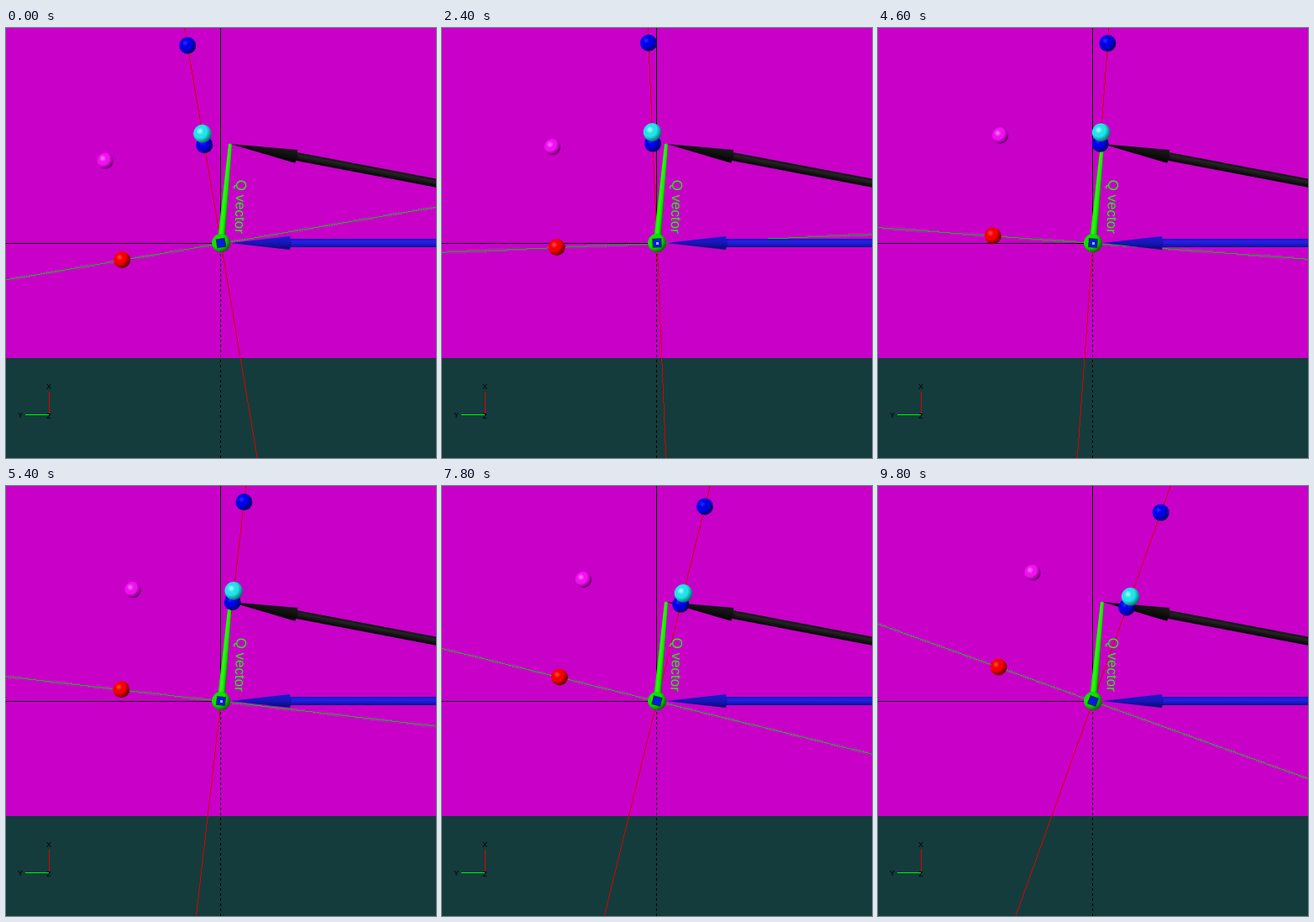
These frames come from a looping animation (512x512 px, 10000 ms). An HTML page with a canvas:

```html
<!DOCTYPE html>
<html lang="en">
<head>
<meta charset="utf-8">
<title>Q vector rotation</title>
<style>
  html, body { margin: 0; width: 100%; height: 100%; overflow: hidden; background: #c800c8; }
  canvas { display: block; width: 512px; height: 512px; }
</style>
</head>
<body>
<canvas id="stage" width="512" height="512"></canvas>
<script>
const ctx = document.getElementById('stage').getContext('2d');
const SIZE = 512, CENTER = 256;
const STEP_MS = 200, STEPS = 50;
const START_DEG = -9.6, STEP_DEG = 0.6;

function rect(color, x, y, w, h) {
  ctx.fillStyle = color;
  ctx.fillRect(x, y, w, h);
}

function polygon(fill, points) {
  ctx.fillStyle = fill;
  ctx.beginPath();
  points.forEach(([x, y]) => ctx.lineTo(x, y));
  ctx.closePath();
  ctx.fill();
}

function shade(x0, y0, x1, y1, colors) {
  const gradient = ctx.createLinearGradient(x0, y0, x1, y1);
  colors.forEach((c, i) => gradient.addColorStop(i / (colors.length - 1), c));
  return gradient;
}

function placed(x, y, angle, paint) {
  ctx.save();
  ctx.translate(x, y);
  ctx.rotate(angle);
  paint();
  ctx.restore();
}

// Lit from the upper left, so the dark rim lies at the lower right.
function ball(x, y, radius, [light, base, dark]) {
  const gradient = ctx.createRadialGradient(x - 3, y - 3, 0, x - 3, y - 3, radius + 4);
  gradient.addColorStop(0, light);
  gradient.addColorStop(0.3, base);
  gradient.addColorStop(0.55, base);
  gradient.addColorStop(1, dark);
  ctx.fillStyle = gradient;
  ctx.beginPath();
  ctx.arc(x, y, radius, 0, Math.PI * 2);
  ctx.fill();
}

const palette = {
  red: ['#ff5040', '#f40000', '#500000'],
  blue: ['#2030ff', '#0000e8', '#000050'],
  cyan: ['#c0ffff', '#20e4e8', '#086468'],
  pink: ['#ff80ff', '#f010f0', '#600060'],
  green: ['#30ff10', '#10e000', '#086000']
};

// Arrow along its local x axis, with the tip at the given point.
function arrow(x, y, angle, head, headHalf, shaftHalf, headColors, shaftColors) {
  placed(x, y, angle, () => {
    rect(shade(0, -shaftHalf, 0, shaftHalf, shaftColors), head, -shaftHalf, 300, shaftHalf * 2);
    polygon(shade(0, -headHalf, 0, headHalf, headColors),
      [[0, 0], [head - 1, -headHalf], [head + 1, 0], [head - 1, headHalf]]);
  });
}

// Crisp one-pixel lines through the centre.
function rotatingAxes(angle) {
  const slope = Math.tan(angle);
  for (let i = 0; i < SIZE; i++) {
    const offset = (i - CENTER) * slope;
    rect('#d80000', Math.round(255.5 - offset), i, 1, 1);
    rect('#00c800', i, Math.round(CENTER + offset), 1, 1);
  }
}

function label(text, x, y, font, color, angle = 0) {
  placed(x, y, angle, () => {
    ctx.font = font;
    ctx.textAlign = 'center';
    ctx.fillStyle = color;
    ctx.fillText(text, 0, 0);
  });
}

function background() {
  rect('#c800c8', 0, 0, SIZE, 393);
  rect('#143c3c', 0, 393, SIZE, 119);
}

function fixedAxes() {
  rect('#000', 255, 0, 1, CENTER);
  rect('#000', 0, 256, CENTER, 1);
  for (let y = CENTER + 1; y < SIZE; y += 6) rect('#000', 255, y, 1, 3);
}

function orientationMark() {
  rect('#e00000', 51, 433, 1, 27);
  rect('#00f000', 23, 460, 28, 1);
  const font = '9px "Liberation Sans", sans-serif';
  label('X', 51, 430, font, '#000');
  label('Y', 17, 464, font, '#000');
  label('Z', 51, 465, font, '#000');
}

function vectors() {
  arrow(267, 138, 0.188, 81, 8, 5,
    ['#1c1c1c', '#101010', '#000'], ['#101010', '#242424', '#141414', '#040404']);
  arrow(267, 256, 0, 72, 8, 5,
    ['#1c1cd0', '#1616b8', '#080870'], ['#1616b8', '#2222e4', '#1a1ad0', '#0c0c88']);
  placed(CENTER, CENTER, 0.093, () => polygon(
    shade(-4.5, 0, 4.5, 0, ['#18c800', '#28ff10', '#18e400', '#086800']),
    [[-4.5, 0], [-2, -118], [0, -119], [2, -118], [4.5, 0]]));
  label('Q vector', 273.5, 212.5, '17px "Liberation Sans", Arial, sans-serif',
    '#20f010', Math.PI / 2 + 0.035);
}

function origin(angle) {
  ball(CENTER, CENTER, 11, palette.green);
  placed(CENTER, CENTER, angle, () => {
    rect('#083c28', -5.5, -5.5, 11, 11);
    rect('#0818e8', -4.5, -4.5, 9, 9);
  });
  if (Math.abs(angle) < 0.14) rect('#a0b0e8', 255, 255, 3, 3);
}

function rotatingBalls(angle) {
  const cos = Math.cos(angle), sin = Math.sin(angle);
  [
    [0, -238.5, 'blue', 10],
    [-119.5, 0, 'red', 10],
    [-119.5, -119.5, 'pink', 9.7],
    [0, -118.5, 'blue', 10],
    [0, -132, 'cyan', 10.8]
  ].forEach(([x, y, color, radius]) =>
    ball(CENTER + x * cos - y * sin, CENTER + x * sin + y * cos, radius, palette[color]));
}

function draw(step) {
  const angle = (START_DEG + STEP_DEG * step) * Math.PI / 180;
  background();
  fixedAxes();
  rotatingAxes(angle);
  vectors();
  origin(angle);
  rotatingBalls(angle);
  orientationMark();
}

function tick() {
  draw(Math.floor(performance.now() / STEP_MS) % STEPS);
  requestAnimationFrame(tick);
}
tick();
</script>
</body>
</html>
```
